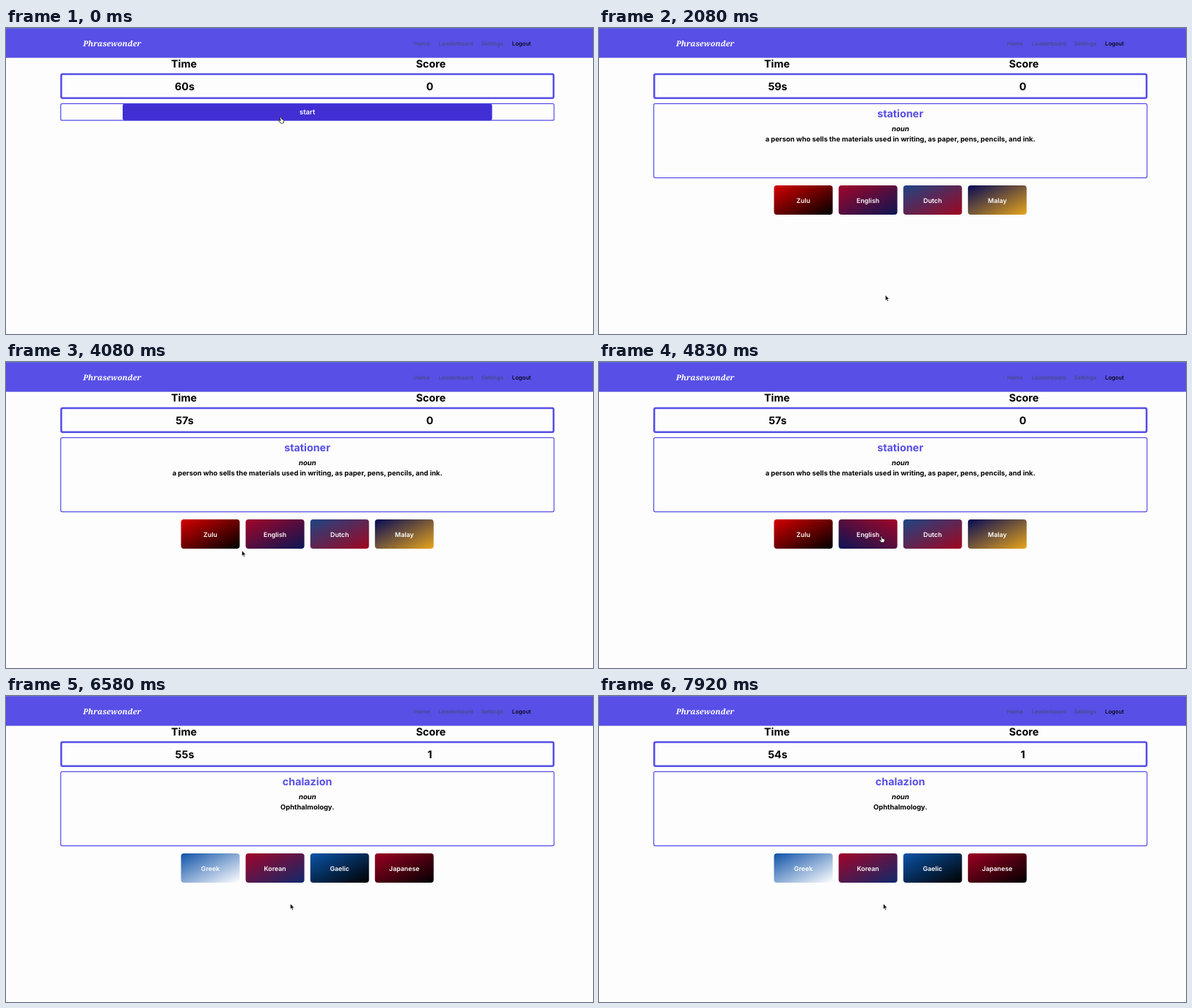
These frames come from a looping animation (800 px wide and 418 px high, 8000 ms). An HTML page:

```html
<!DOCTYPE html>
<html lang="en">
<head>
<meta charset="utf-8">
<title>Word origin quiz</title>
<style>
  html, body { margin: 0; width: 100%; height: 100%; overflow: hidden; background: #fdfdfd; }
  svg { display: block; width: 100vw; height: 100vh; }
  text { font-family: Inter, sans-serif; text-rendering: geometricPrecision; }
  .logo { font-family: "Noto Serif", serif; font-style: italic; }
</style>
</head>
<body>
<svg viewBox="0 0 800 418">
  <defs id="gradients"></defs>
  <g id="header"></g>
  <g id="stage"></g>
  <g id="cursor"></g>
</svg>
<script>
const LOOP = 8000;
const CLICK_START = 500, LOADED = 1000, TIMER_START = 1075, ANSWERED = 5170;
const INDIGO = '#574fe6', DARK_INDIGO = '#412fd4';
const BUTTON = { x: 238.5, y: 215, w: 80, h: 40, step: 88.1 };

const questions = [
  {
    word: 'stationer',
    meaning: 'a person who sells the materials used in writing, as paper, pens, pencils, and ink.',
    answers: [
      ['Zulu', '#d40000', '#000000'],
      ['English', '#a20528', '#0a1654'],
      ['Dutch', '#1e4584', '#a00620'],
      ['Malay', '#060a56', '#e6a51c'],
    ],
  },
  {
    word: 'chalazion',
    meaning: 'Ophthalmology.',
    answers: [
      ['Greek', '#0f52a8', '#ffffff'],
      ['Korean', '#a20428', '#0e2a6c'],
      ['Gaelic', '#0a54a8', '#000000'],
      ['Japanese', '#9c0022', '#000000'],
    ],
  },
];

// Pointer stops: time, x, y
const path = [
  [0, 374, 121], [1420, 374, 121], [1680, 385, 360], [1900, 390, 382],
  [2480, 391, 307.5], [3440, 391, 307.5], [4030, 321.5, 257.5], [4280, 321.5, 257.5],
  [4850, 384.7, 237.5], [5650, 384.7, 237.5], [6250, 387.5, 283.7], [LOOP, 387.5, 283.7],
];

const $ = id => document.getElementById(id);

// Text whose capitals are vertically centred on y
function label(text, x, y, size, { weight = 700, fill = '#000', anchor = 'middle', extra = '' } = {}) {
  return `<text x="${x}" y="${y + size * 0.364}" font-size="${size}" font-weight="${weight}"
    fill="${fill}" text-anchor="${anchor}" ${extra}>${text}</text>`;
}

function rect(x, y, w, h, r, paint) {
  return `<rect x="${x}" y="${y}" width="${w}" height="${h}" rx="${r}" ${paint}/>`;
}

const outline = (y, h, width) =>
  rect(74 + width / 2, y + width / 2, 673.5 - width, h - width, 2, `fill="none" stroke="${INDIGO}" stroke-width="${width}"`);

function pointerAt(t) {
  const i = path.findIndex(stop => stop[0] > t);
  const [t0, x0, y0] = path[i - 1], [t1, x1, y1] = path[i];
  const p = (t - t0) / (t1 - t0), ease = p * p * (3 - 2 * p);
  return { x: x0 + (x1 - x0) * ease, y: y0 + (y1 - y0) * ease };
}

const inside = (p, x, y, w, h) => p.x >= x && p.x <= x + w && p.y >= y && p.y <= y + h;

function answerButtons(index, pointer) {
  let hovered = false;
  const markup = questions[index].answers.map(([name], i) => {
    const x = BUTTON.x + i * BUTTON.step;
    const hover = inside(pointer, x, BUTTON.y, BUTTON.w, BUTTON.h);
    hovered ||= hover;
    return rect(x, BUTTON.y, BUTTON.w, BUTTON.h, 4, `fill="url(#g${index}${i}${hover ? 'hover' : ''})"`) +
      label(name, x + BUTTON.w / 2, 235.3, 8.8, { weight: 600, fill: '#fff' });
  }).join('');
  return { markup, hovered };
}

function render(t) {
  const pointer = pointerAt(t);
  const seconds = 60 - Math.max(0, Math.floor((t - TIMER_START) / 1000));
  const answered = t >= ANSWERED;
  let hand = false;
  let out = label(seconds + 's', 243.5, 79.7, 14.3) + label(answered ? 1 : 0, 577.6, 79.7, 14.3);

  if (t < CLICK_START) {
    hand = true;
    out += outline(102.8, 24, 1.2) +
      rect(159, 103.4, 503.5, 22.8, 3, `fill="${DARK_INDIGO}"`) +
      label('start', 410.7, 115, 9.5, { weight: 600, fill: '#fff' });
  } else {
    out += outline(102.8, 102.4, 1.2);
  }

  if (t >= LOADED) {
    const index = answered ? 1 : 0;
    const { word, meaning } = questions[index];
    const buttons = answerButtons(index, pointer);
    hand = buttons.hovered;
    out += label(word, 410.6, 117.2, 14.3, { fill: pointer.y < 127 ? DARK_INDIGO : INDIGO }) +
      label('noun', 410.8, 137.2, 9.5, { extra: 'font-style="italic"' }) +
      label(meaning, 410.7, 151.2, 9.4) + buttons.markup;
  }

  $('stage').innerHTML = out;
  const shape = hand
    ? '<path d="M-.7 .9Q.2 -.1 1 1L1.7 3.6 4 4.2Q5 4.6 4.8 6L4 9H.2L-2.4 5.7Q-2.3 4.6-1.2 5.1L.1 6Z" fill="#fff" stroke="#111" stroke-width=".8"/>'
    : '<path d="M0 0V7.6L1.7 6 2.8 8.7 4.1 8.1 3 5.6H5.3Z" fill="#000" stroke="#fff" stroke-width=".6"/>';
  $('cursor').innerHTML = `<g transform="translate(${pointer.x} ${pointer.y})">${shape}</g>`;
}

function buildFixedParts() {
  $('gradients').innerHTML = questions.map((question, q) => question.answers.map(([, from, to], i) => {
    const stops = `<stop stop-color="${from}"/><stop offset="1" stop-color="${to}"/>`;
    return `<linearGradient id="g${q}${i}" x1="0" y1="0" x2="1" y2="1">${stops}</linearGradient>
      <linearGradient id="g${q}${i}hover" x1="1" y1="0" x2="0" y2="1">${stops}</linearGradient>`;
  }).join('')).join('');

  const nav = [['Home', 556], ['Leaderboard', 589.7], ['Settings', 647.7], ['Logout', 689.8]];
  $('header').innerHTML = rect(0, 0, 800, 40.7, 0, `fill="${INDIGO}"`) +
    rect(0, 0, 800, 0.8, 0, 'fill="#6b74d8"') +
    label('Phrasewonder', 105, 21.5, 10.6, { fill: '#fff', anchor: 'start', extra: 'class="logo"' }) +
    nav.map(([name, x]) => label(name, x, 21, 7.7, {
      weight: 500, anchor: 'start', fill: name === 'Logout' ? '#000' : '#474a80',
    })).join('') +
    label('Time', 242.5, 48.7, 14.3) + label('Score', 579, 48.7, 14.3) +
    outline(61.8, 35.2, 2.5);
}

function tick(now) {
  render(now % LOOP);
  requestAnimationFrame(tick);
}

buildFixedParts();
render(0);
requestAnimationFrame(tick);
</script>
</body>
</html>
```
